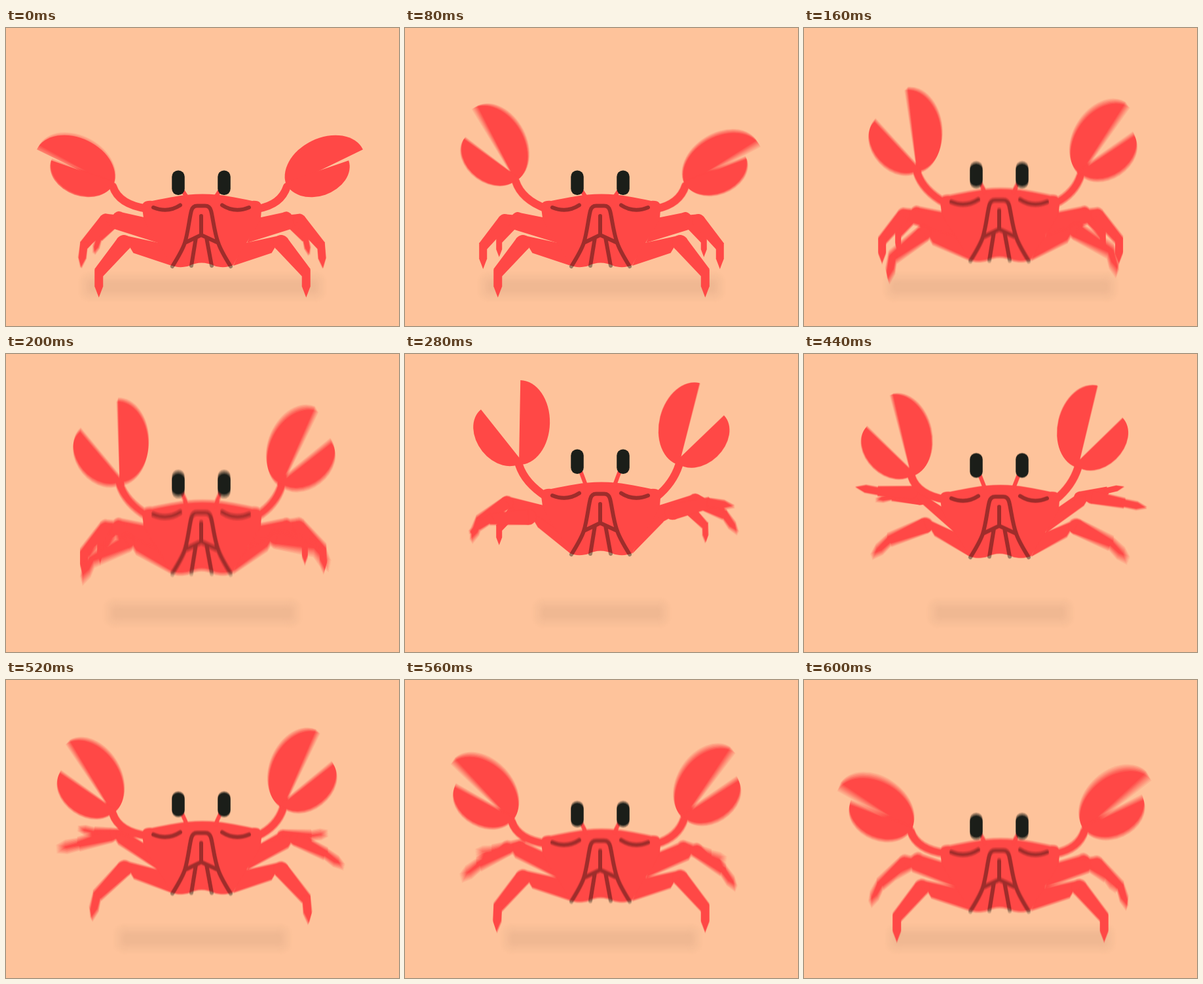
Recreate the animation shown at these times as an HTML page with a canvas. Size 600 px wide and 455 px high, loop 640 ms.

```html
<!DOCTYPE html>
<html lang="en">
<head>
<meta charset="utf-8">
<title>Jumping crab</title>
<style>
  html, body { margin: 0; width: 100%; height: 100%; overflow: hidden; background: #fec39b; }
  canvas { display: block; width: 600px; height: 455px; }
</style>
</head>
<body>
<canvas id="stage" width="600" height="455"></canvas>
<script>
const W = 600, H = 455;
const LOOP = 640, STEP = 40, SHUTTER = 13, SAMPLES = 8;
const SAND = [254, 195, 155], RED = '#ff4846', INK = '#1b1e19', LINE = 'rgba(0,0,0,.38)';

const screen = document.getElementById('stage').getContext('2d');
const buffer = Object.assign(document.createElement('canvas'), { width: W, height: H });
const ctx = buffer.getContext('2d');

const wrap = t => (t % LOOP + LOOP) % LOOP;
const clamp = u => Math.min(1, Math.max(0, u));
const easeIn = u => clamp(u) ** 2;
const easeOut = u => 1 - (1 - clamp(u)) ** 2;
const easeInOut = u => (1 - Math.cos(Math.PI * clamp(u))) / 2;

// 0 on the ground, 1 at the top: a spring up, a pause, then a fall under gravity.
const jump = t => easeInOut((t - 120) / 160) - easeIn((t - 370) / 256);

// A single swing out and back.
const pulse = (t, start, span) => Math.sin(Math.PI * clamp(wrap(t - start) / span)) ** 2;

// Leg shapes, drawn for the left side and mirrored for the right.
// "lift" and "curl" tie the knee height and the foot angle to the swing of the shin.
const FRONT = {
  knee: [180, 328], hip: [[238, 329], [253, 363]], shin: 59.5, foot: 38, r: [12, 8.5, 6.5],
  lift: 0.45, curl: 1.35
};
const MIDDLE = {
  knee: [152, 294], hip: [[215, 290], [232, 328]], shin: 51, foot: 35, r: [10, 7.5, 6],
  lift: 0.55, curl: 1.9
};
const BACK = {
  knee: [172, 290], hip: [[215, 290], [226, 318]], shin: 44, foot: 26, r: [9, 6, 4.5],
  lift: 0.27, curl: 1.7
};
const REST = 40, FOOT_LAG = 20;

const leg = (shape, start, span, swing) => ({ shape, start, span, swing });

// Claws open over 250 ms; "close" and "drop" give start and length for the pincers and the arm.
const LEFT = {
  x: 163, open: 0, close: [280, 335], drop: [280, 200], spread: 65,
  legs: [leg(BACK, 295, 375, 62), leg(MIDDLE, 190, 470, 53), leg(FRONT, 80, 490, 51)]
};
const RIGHT = {
  x: 171, open: 70, close: [419, 213], drop: [419, 213], spread: 51,
  legs: [leg(BACK, 245, 420, 65), leg(MIDDLE, 140, 520, 42), leg(FRONT, 75, 460, 66)]
};

const BODY = new Path2D(`M208 275 C207 266 213 263 223 264 C250 259 270 253.5 300 253.5
  C330 253.5 350 259 376 264 C387 263 391 267 390 277 L389 290
  C381 310 364 330 347 362 C338 366 326 366 318 363 C305 357 292 357 280 363
  C271 366 259 366 252 362 C235 330 218 310 210 290 Z`);
const FACE = new Path2D(`M225 274 Q247 283 266 270.5 M371 274 Q349 283 330 270.5
  M254 364 Q269 340 273 328 C278 312 280 290 283 279 Q285 271.5 292 271.5
  H304 Q311 271.5 313 279 C316 290 318 312 324 328 Q328 340 343 364
  M298 287 V316 L273 328 M298 316 L324 328 M290 320 L283 363 M306 320 L314 363`);

const rad = deg => deg * Math.PI / 180;
// Angles grow outwards from straight down.
const reach = ([x, y], deg, len) => [x - Math.sin(rad(deg)) * len, y + Math.cos(rad(deg)) * len];

function polygon(points) {
  ctx.beginPath();
  points.forEach(p => ctx.lineTo(...p));
  ctx.fill();
}

function disc([x, y], r) {
  ctx.beginPath();
  ctx.arc(x, y, r, 0, 2 * Math.PI);
  ctx.fill();
}

function drawLeg({ shape, start, span, swing }, t) {
  const out = swing * pulse(t, start, span);
  const shin = REST + out;
  const foot = swing * shape.curl * pulse(t - FOOT_LAG, start, span);
  const up = shape.lift * out;
  const [rKnee, rAnkle, rFoot] = shape.r;
  const [top, bottom] = shape.hip;
  const knee = [shape.knee[0] + 0.4 * up, shape.knee[1] - up];
  const ankle = reach(knee, shin, shape.shin);
  polygon([
    top, [knee[0] - 2, knee[1] - rKnee],
    [knee[0] + 1.2 * rKnee, knee[1] + 1.3 * rKnee], bottom
  ]);
  disc(knee, rKnee);
  polygon([
    reach(knee, shin + 90, rKnee), reach(ankle, shin + 90, rAnkle),
    reach(ankle, shin - 90, rAnkle), reach(knee, shin - 90, rKnee)
  ]);
  const heel = reach(ankle, foot, -5), toe = reach(ankle, foot, shape.foot * 0.55);
  polygon([
    reach(heel, foot + 90, rFoot), reach(toe, foot + 90, rFoot), reach(ankle, foot, shape.foot),
    reach(toe, foot - 90, rFoot), reach(heel, foot - 90, rFoot)
  ]);
}

function drawPincer(x, y, deg, edge, rx, ry, from) {
  ctx.save();
  ctx.translate(x, y);
  ctx.rotate(-rad(deg));
  ctx.beginPath();
  ctx.ellipse(edge, -ry, rx, ry, 0, from, from + Math.PI);
  ctx.fill();
  ctx.restore();
}

function drawClaw({ x, open, close, drop, spread }, t) {
  const opened = easeOut((t - open) / 250);
  const gape = opened - easeIn((t - close[0]) / close[1]);
  const raise = opened - easeInOut((t - drop[0]) / drop[1]);
  const px = x + 11 * raise, py = 242 - 15 * raise;
  ctx.lineWidth = 12;
  ctx.beginPath();
  ctx.moveTo(px, py);
  ctx.quadraticCurveTo(px + 9, py + 28, 216, 276);
  ctx.stroke();
  drawPincer(px, py, 64 - spread * gape, 0, 46, 64.5, -Math.PI / 2);
  drawPincer(px, py, 71 - spread * gape / 2, 7, 38, 51, Math.PI / 2);
}

function drawSide(side, t) {
  side.legs.forEach(l => drawLeg(l, t));
  drawClaw(side, t);
}

function drawEye(x, lean, lift) {
  ctx.lineWidth = 6;
  ctx.beginPath();
  ctx.moveTo(x + lean, 240 - lift);
  ctx.lineTo(x + 13 * lean, 258);
  ctx.stroke();
  ctx.fillStyle = INK;
  ctx.beginPath();
  ctx.roundRect(x - 9.75, 217.5 - lift, 19.5, 37.5, 9.5);
  ctx.fill();
}

function drawShadow(half) {
  const layers = 10;
  for (let i = 0; i < layers; i++) {
    const dark = 0.055 * (i + 1) / layers, inset = 2 * i;
    ctx.fillStyle = `rgb(${SAND.map(c => Math.round(c * (1 - dark)))})`;
    ctx.beginPath();
    ctx.roundRect(300 - half + inset, 371 + inset, 2 * (half - inset), 48 - 2 * inset, 18 - 1.5 * i);
    ctx.fill();
  }
}

function drawScene(time) {
  const t = wrap(time);
  ctx.fillStyle = `rgb(${SAND})`;
  ctx.fillRect(0, 0, W, H);
  drawShadow(190 - 84 * jump(t));

  ctx.save();
  ctx.translate(0, -58 * jump(t));
  ctx.lineCap = ctx.lineJoin = 'round';
  ctx.fillStyle = ctx.strokeStyle = RED;
  drawSide(LEFT, t);
  ctx.save();
  ctx.translate(W, 0);
  ctx.scale(-1, 1);
  drawSide(RIGHT, t);
  ctx.restore();
  ctx.fill(BODY);
  // The eyes run slightly ahead of the body.
  const lift = 14 * jump(t + 12);
  drawEye(263, 1, lift);
  drawEye(333, -1, lift);
  ctx.strokeStyle = LINE;
  ctx.lineWidth = 6;
  ctx.stroke(FACE);
  ctx.restore();
}

// Averages several moments within the shutter for motion blur.
function expose(t) {
  for (let i = 0; i < SAMPLES; i++) {
    drawScene(t + SHUTTER * ((i + 0.5) / SAMPLES - 0.5));
    screen.globalAlpha = 1 / (i + 1);
    screen.drawImage(buffer, 0, 0);
  }
}

const start = performance.now();
let shown = -1;
function tick() {
  const step = Math.floor((performance.now() - start) % LOOP / STEP);
  if (step !== shown) {
    shown = step;
    expose(step * STEP);
  }
  requestAnimationFrame(tick);
}
tick();
</script>
</body>
</html>
```
